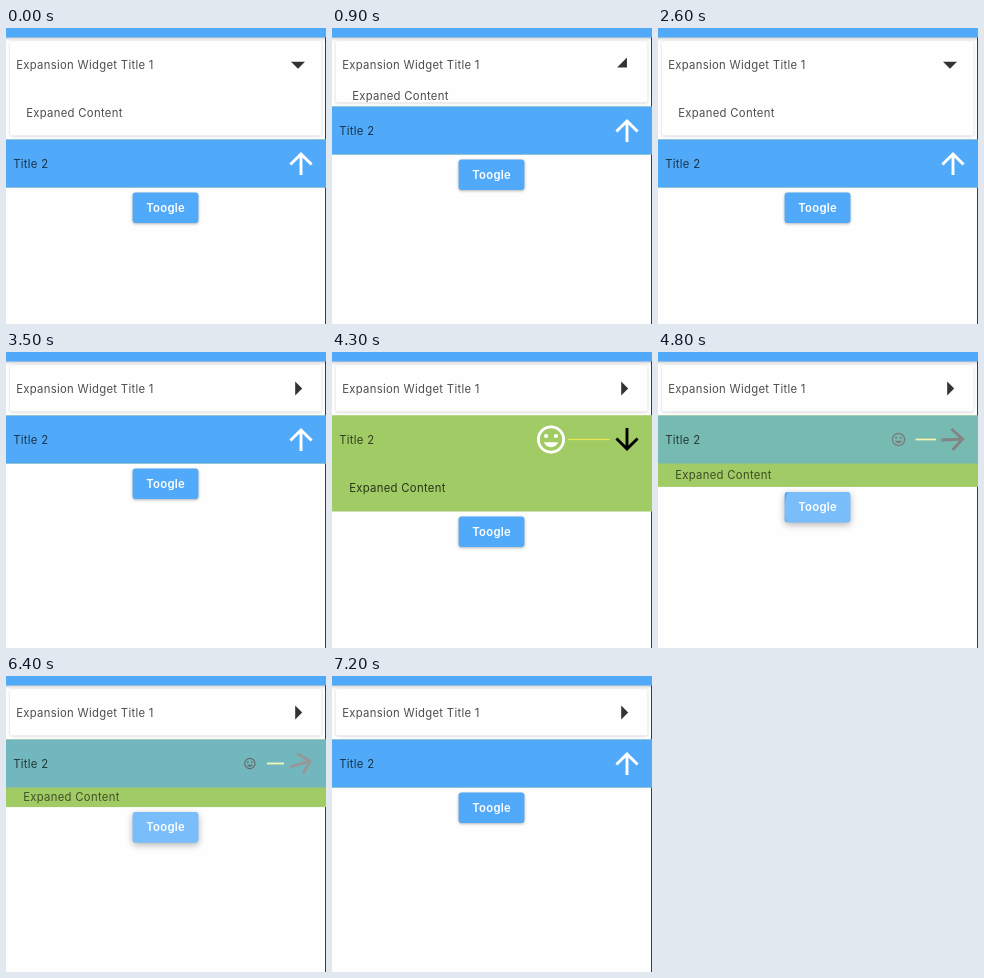
Animation, 320 px wide and 296 px high, one loop 7400 ms. Source, as an HTML page with a canvas:

```html
<!DOCTYPE html>
<html lang="en">
<head>
<meta charset="utf-8">
<title>Expansion widgets</title>
<style>
  html, body { margin: 0; width: 320px; height: 296px; overflow: hidden; background: #fefefe; }
  canvas { display: block; }
</style>
</head>
<body>
<canvas id="stage" width="320" height="296"></canvas>
<script>
const ctx = document.getElementById('stage').getContext('2d');
const LOOP = 7400;
const DURATION = 400;
const BLUE = [80, 169, 249];
const GREEN = [161, 203, 101];
const WHITE = [255, 255, 255];
const BLACK = [0, 0, 0];
const YELLOW = [236, 232, 76];
const INK = 'rgba(0,0,0,.7)';

// Start times; each one flips the panel between open and closed.
const cardToggles = [700, 1460, 3050];
const panelToggles = [3650, 4660, 5437, 6234];
const presses = [3560, 4580, 5400, 6100];

const arrowUp = new Path2D('M-8 0l1.41 1.41L-1-4.17V8h2V-4.17l5.58 5.59L8 0 0-8z');
const caret = new Path2D('M-5-2L0 3 5-2z');
const grin = new Path2D('M0 5.5C2.33 5.5 4.31 4.04 5.11 2H-5.11C-4.31 4.04-2.33 5.5 0 5.5z');

const clamp = x => Math.min(1, Math.max(0, x));
const mix = (a, b, k) => a + (b - a) * k;
const rgb = (a, b = a, k = 0) => `rgb(${a.map((c, i) => Math.round(mix(c, b[i], k)))})`;

// Cubic bezier (.42, 0, 1, 1), solved for its parameter by bisection.
function easeIn(x) {
  if (x <= 0 || x >= 1) return clamp(x);
  let low = 0, high = 1;
  for (let i = 0; i < 24; i++) {
    const s = (low + high) / 2, r = 1 - s;
    if (1.26 * s * r * r + 3 * s * s * r + s ** 3 < x) low = s;
    else high = s;
  }
  return low * low * (3 - 2 * low);
}

function openness(t, toggles, initial) {
  let value = initial, direction = initial ? -1 : 1;
  for (const start of toggles) {
    value += direction * clamp((t - start) / DURATION);
    direction = -direction;
  }
  return clamp(value);
}

function rect(x, y, w, h, color) {
  ctx.fillStyle = color;
  ctx.fillRect(x, y, w, h);
}

function raised(x, y, w, h, radius, color, alpha, blur, drop) {
  ctx.save();
  ctx.shadowColor = `rgba(0,0,0,${alpha})`;
  ctx.shadowBlur = blur;
  ctx.shadowOffsetY = drop;
  ctx.fillStyle = color;
  ctx.beginPath();
  ctx.roundRect(x, y, w, h, radius);
  ctx.fill();
  ctx.restore();
}

function label(text, x, y, color = INK, weight = 400) {
  ctx.font = `${weight} 11.3px Inter, sans-serif`;
  ctx.letterSpacing = '0.3px';
  ctx.fillStyle = color;
  ctx.fillText(text, x, y);
}

function icon(path, x, y, scale, angle, color) {
  ctx.save();
  ctx.translate(x, y);
  ctx.rotate(angle);
  ctx.scale(scale, scale);
  ctx.fillStyle = color;
  ctx.fill(path);
  ctx.restore();
}

function clipped(x, y, w, h, radius, draw) {
  ctx.save();
  ctx.beginPath();
  ctx.roundRect(x, y, w, h, radius);
  ctx.clip();
  draw();
  ctx.restore();
}

function smiley(x, y, scale, color) {
  ctx.save();
  ctx.translate(x, y);
  ctx.scale(scale, scale);
  ctx.fillStyle = ctx.strokeStyle = color;
  ctx.lineWidth = 2;
  ctx.beginPath();
  ctx.arc(0, 0, 9, 0, Math.PI * 2);
  ctx.stroke();
  for (const side of [-1, 1]) {
    ctx.beginPath();
    ctx.arc(side * 3.5, -2.5, 1.5, 0, Math.PI * 2);
    ctx.fill();
  }
  ctx.fill(grin);
  ctx.restore();
}

function drawCard(value) {
  const height = 46.5 + 48 * easeIn(value);
  raised(4, 13, 311.5, height, 2, '#fefefe', 0.18, 3, 0.8);
  label('Expansion Widget Title 1', 10.2, 40.8);
  icon(caret, 292, 36.5, 1.4, (value - 1) * Math.PI / 2, 'rgba(0,0,0,.8)');
  if (value > 0) {
    clipped(4, 13, 311.5, height, 2, () =>
      label('Expaned Content', 20.2, 64.7 + 24 * easeIn(value)));
  }
}

function drawPanel(top, k) {
  const middle = top + 24, bottom = top + 48 + 48 * k;
  rect(0, top, 320, bottom - top, rgb(GREEN));
  rect(0, top, 320, 48, rgb(BLUE, GREEN, k));
  label('Title 2', 7.2, middle + 4);
  if (k > 0) {
    const width = 42 * k, thickness = mix(2.2, 1.2, k);
    smiley(261 - width, middle, 1.4 * k, rgb(BLACK, WHITE, k));
    rect(278 - width, middle - thickness / 2, width, thickness, rgb(WHITE, YELLOW, k));
    clipped(0, top, 320, bottom - top, 0, () =>
      label('Expaned Content', 17.2, top + 52 + 24 * k, `rgba(0,0,0,${mix(0.5, 0.75, k)})`));
  }
  icon(arrowUp, 295, middle, 1.45, Math.PI * k, rgb(WHITE, BLACK, k));
  return bottom;
}

function drawButton(y, t) {
  const press = presses.findLast(p => p <= t);
  const age = press === undefined ? Infinity : t - press;
  const strength = clamp((500 - age) / 180);
  const lift = strength * clamp(age / 100);
  raised(126.6, y, 65.8, 30.6, 3, rgb(BLUE), 0.3, 3 + 4 * lift, 1 + 1.3 * lift);
  if (strength > 0) {
    clipped(126.6, y, 65.8, 30.6, 3, () => {
      ctx.fillStyle = `rgba(255,255,255,${0.23 * strength})`;
      ctx.beginPath();
      ctx.arc(165, y + 17.5, 8 + 0.14 * age, 0, Math.PI * 2);
      ctx.fill();
    });
  }
  ctx.textAlign = 'center';
  label('Toogle', 159.6, y + 19.4, '#fff', 600);
  ctx.textAlign = 'left';
}

function draw(t) {
  const card = openness(t, cardToggles, 1);
  const panel = easeIn(openness(t, panelToggles, 0));
  rect(0, 0, 320, 296, '#fefefe');
  rect(319, 0, 1, 296, '#3c3c3c');
  drawCard(card);
  raised(-6, -10, 332, 19.4, 0, rgb(BLUE), 0.28, 4, 1);
  const bottom = drawPanel(63.5 + 48 * easeIn(card), panel);
  drawButton(bottom + 5, t);
}

const origin = performance.now();
function tick() {
  draw((performance.now() - origin) % LOOP);
  requestAnimationFrame(tick);
}
tick();
</script>
</body>
</html>
```
